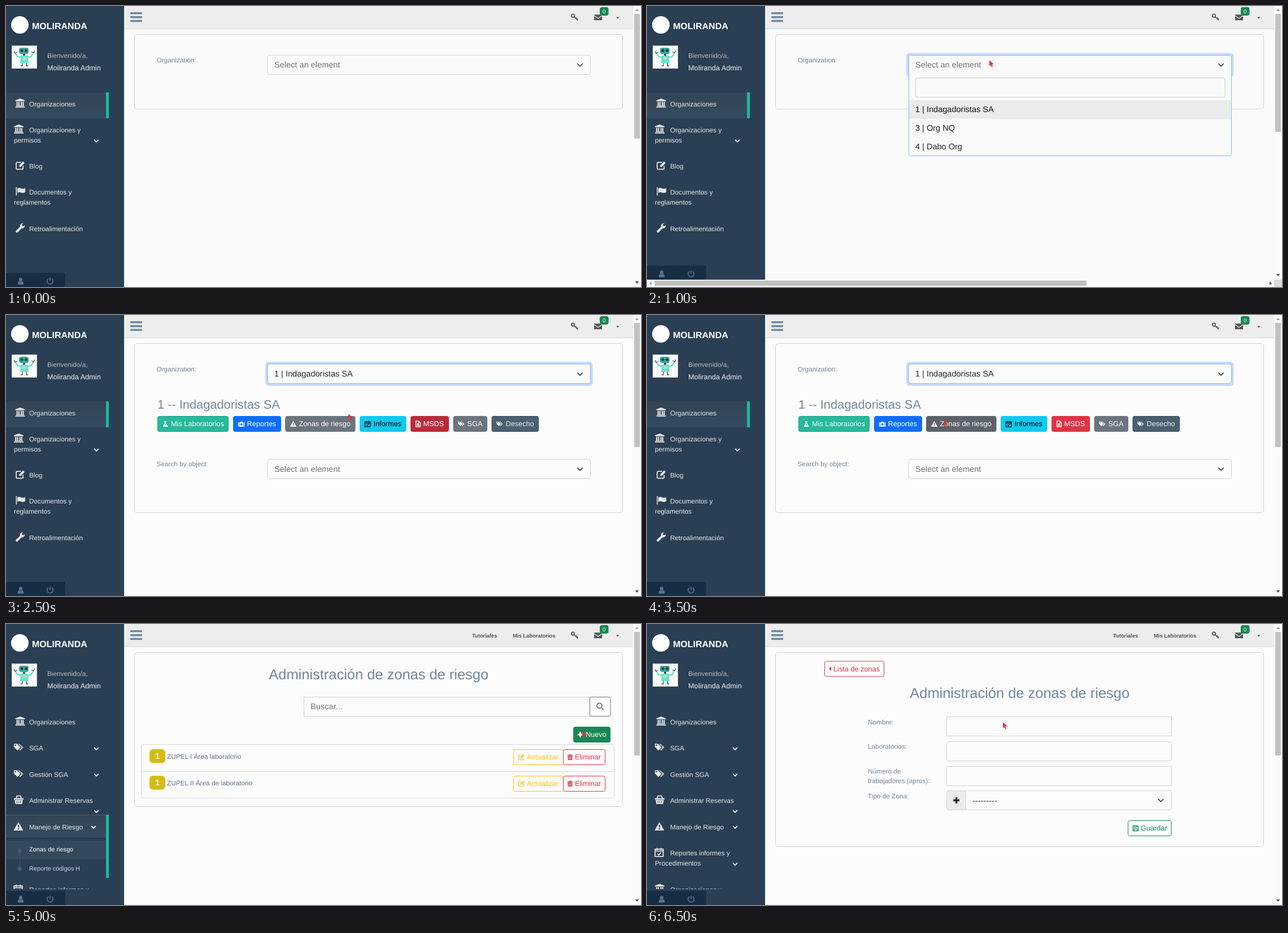
An HTML page that plays this animation: 1124 px wide and 498 px high, repeating every 8000 ms.

```html
<!DOCTYPE html>
<html lang="es">
<head>
<meta charset="utf-8">
<title>Zonas de riesgo</title>
<style>
html, body { margin: 0; width: 100%; height: 100%; overflow: hidden; background: #fcfcfc; }
svg { display: block; width: 100%; height: 100%; font-family: "Liberation Sans", Arial, sans-serif; text-rendering: geometricPrecision; }
</style>
</head>
<body>
<svg id="stage" viewBox="0 0 1124 498"></svg>
<script>
const S = 11.8, M = 12.72, L = 14.54;
const GRAY = '#6c757d', SLATE = '#73879c', LINE = '#ced4da', RED = '#dc3545', GREEN = '#198754',
  AMBER = '#ffc107', TEAL = '#1abb9c', NAVY = '#2a3f54', PALE = '#e7e7e7', INK = '#212529';

// 16 x 16 icons: [filled path, stroked path]
const ICONS = {
  bank: ['M8 0l8 3v1.5H0V3zM2 5.5h2v6h1v-6h2v6h2v-6h2v6h1v-6h2v6h.7v1.2H1.3v-1.2H2zM0 13.5h16V15H0z'],
  edit: ['M6 10.5V8l6.5-6.5L15 4l-6.5 6.5z', 'M12.5 9v3.5a2 2 0 0 1-2 2H3a2 2 0 0 1-2-2V5a2 2 0 0 1 2-2h6'],
  flag: ['M.5 1H2v14H.5zM3 3q3-2 6 0 3 1.5 7-.5v7q-4 2-7 .5-3-1.5-6 .5z'],
  wrench: ['M15.3 3.5L12.5 5l-2-1V1.8L13 .4A4.4 4.4 0 0 0 7.5 6L.8 12.2a1.8 1.8 0 0 0 2.8 2.8L10 8.5a4.4 4.4 0 0 0 5.3-5z'],
  user: ['M8 1a3.5 4 0 1 1 0 8 3.5 4 0 1 1 0-8zM2 15q-.5-6 3-6.5 3 2 6 0 3.5.5 3 6.5z'],
  power: ['', 'M4.8 3a6 6 0 1 0 6.4 0M8 1v6.5'],
  tags: ['M0 2h5l6 6-5 5.5-6-6zM2.5 3.3a1.2 1.2 0 1 0 .01 0zM7 2h1.6L15.5 8l-5.3 5.5-1.2-1L13 8z'],
  basket: ['M0 5.5h16v2.3H0zM1.3 8.5h13.4l-1 6.5H2.3zM4.5 10v3.5h1V10zM7.5 10v3.5h1V10zM10.5 10v3.5h1V10z', 'M3.5 6L5 1.5h6L12.5 6'],
  warn: ['M8 .8L16 15H0zM7 5.5V10h2V5.5zM7 11.3v2h2v-2z'],
  calendar: ['', 'M1.2 3h13.6v12H1.2zM1.2 6h13.6M4.7.8v3.6M11.3.8v3.6M5 10.3l2.2 2.2 4-4'],
  flask: ['M5 1h6v1.3H9.7v4L14 13.5q.5 1.5-1 1.5H3q-1.5 0-1-1.5l4.3-7.2v-4H5zM7.8 6.8l-2 3.4h4.4l-2-3.4z'],
  medkit: ['M0 4h2v11H0zM3 4h2V2h6v2h2v11H3zM6.3 3.2V4h3.4v-.8zM7 6.5v2H5v2h2v2h2v-2h2v-2H9v-2zM14 4h2v11h-2z'],
  file: ['', 'M2.5 1h7l4 4v10h-11zM9.5 1v4h4M5 7.8h6M5 10h6M5 12.3h6'],
  plus: ['M6 1.5h4V6h4.5v4H10v4.5H6V10H1.5V6H6z'],
  trash: ['M6 1h4l.7 1.5H15V4H1V2.5h4.3zM2.5 5h11v10h-11zM5 6.5v7h1v-7zM7.5 6.5v7h1v-7zM10 6.5v7h1v-7z'],
  search: ['', 'M6.8 1.5a5 5 0 1 1 0 10.2 5 5 0 1 1 0-10.2zM10.5 10.5l4.5 4.5'],
  save: ['', 'M1.5 1.5h10l3 3v10h-13zM4.5 1.5v4h6v-4M4 14.5v-5h8v5'],
  key: ['', 'M4.5 1.2a3.3 3.3 0 1 1 0 6.6 3.3 3.3 0 1 1 0-6.6zM7 7l7.5 7.5M10 10.5l2.3-2.3M12.5 13l2.3-2.3'],
  mail: ['M0 2.5h16v1.2L8 9.5 0 3.7zM0 5.3l8 5.9 8-5.9V14H0z'],
  chevron: ['', 'M2 5l6 6 6-6']
};

const text = (x, y, s, size = S, fill = SLATE, more = '') =>
  `<text x="${x}" y="${y}" font-size="${size}" fill="${fill}" ${more}>${s}</text>`;
const bold = 'font-weight="bold"', middle = 'text-anchor="middle"';
// edges given as left, top, right, bottom
const box = (x, y, r, b, fill = 'none', stroke = 'none', rx = 0) =>
  `<rect x="${x}" y="${y}" width="${r - x}" height="${b - y}" rx="${rx}" fill="${fill}" stroke="${stroke}"/>`;
const path = (d, fill, more = '') => `<path d="${d}" fill="${fill}" ${more}/>`;
const icon = (name, cx, cy, size, color, weight = 1.7) => {
  const [solid, line] = ICONS[name], k = size / 16;
  return `<g transform="translate(${cx - size / 2} ${cy - size / 2}) scale(${k})">` +
    path(solid, color, 'fill-rule="evenodd"') +
    (line ? path(line, 'none', `stroke="${color}" stroke-width="${weight}"`) : '') + '</g>';
};
const button = (x, y, r, b, label, tx, glyph, gx, color, fill = 'none', ink = color) =>
  box(x, y, r, b, fill, color, 3) + (glyph ? icon(glyph, gx, (y + b) / 2, 11.5, ink) : '') +
  text(tx, y + 17.8, label, M, ink);
const select = (y, label, color = GRAY, focus = false) =>
  (focus ? box(459, y - 4, 1038.5, y + 38.5, '#c5dafa', 'none', 6) : '') +
  box(463, y, 1034.5, y + 34.5, focus ? '#fcfcfc' : 'none', focus ? '#86b7fe' : LINE, 4) +
  text(475, y + 22, label, L, color) + icon('chevron', 1016, y + 17.5, 12.5, '#343a40', 2);
const card = bottom => box(227.5, 50.5, 1091.5, bottom, 'none', '#d0d2d4', 5);

function robot() {
  return box(10.5, 70.5, 54.5, 110.5, '#fbfbfb', '#cfd5da') +
    path('M16 83l5 7 7 1M49 82l-5 8-7 1', 'none', 'stroke="#4fdcc4" stroke-width="2"') +
    path('M14 80l2 4 4-2M51 79l-2 4-4-2M29 101v5h-3M36 101v5h3', 'none', 'stroke="#3b5560" stroke-width="1.3"') +
    box(23, 74, 40, 85, '#3ba898', 'none', 4) +
    '<circle cx="28" cy="79" r="2.6" fill="#24434c"/><circle cx="35.5" cy="79" r="2.6" fill="#24434c"/>' +
    path('M30 85h4v3h-4z', '#35535b') + path('M26 88h13l1 13H25z', '#5ce8cf') + box(29, 91, 36, 95, '#f6c8b8');
}

const chevron = (x, y) => icon('chevron', x, y, 10.5, PALE, 3);
const item = (y, name, ix, label, second = '') =>
  icon(name, ix, y - 1.5, 17, PALE) + text(41, y + 4, label, S, PALE) + (second && text(14, y + 22, second, S, PALE));
const active = (top, bottom) => box(0, top, 177, bottom, 'url(#active)');

const homeMenu = () => active(153, 199) + box(177, 153, 182, 199, TEAL) +
  item(174, 'bank', 25, 'Organizaciones') +
  item(220, 'bank', 22.5, 'Organizaciones y', 'permisos') + chevron(160, 239) +
  item(284, 'edit', 25.5, 'Blog') +
  item(330, 'flag', 25.5, 'Documentos y', 'reglamentos') +
  item(395, 'wrench', 25.5, 'Retroalimentación');

function riskMenu(open) {
  const cx = open ? 160 : 156;
  let s = open ? active(338, 380) + box(0, 338, 177, 339, '#4a5c6d') + box(0, 379, 177, 380, '#1e3042') +
    box(177, 338, 182, 450, TEAL) + box(0, 384, 177, 417, '#34485b') : '';
  s += item(174, 'bank', 25, 'Organizaciones') + item(220, 'tags', 22.5, 'SGA') + chevron(cx, 221) +
    item(267, 'tags', 22.5, 'Gestión SGA') + chevron(cx, 267.5) +
    item(313, 'basket', 22.5, 'Administrar Reservas') + chevron(cx, 332) +
    item(360, 'warn', 22, 'Manejo de Riesgo') + chevron(open ? 155 : 156, 360);
  if (open) {
    s += box(24, 402, 25, 434, '#425668') +
      [402, 434].map(y => `<circle cx="24.5" cy="${y}" r="3.5" fill="#4a5e70"/>`).join('') +
      text(41, 403, 'Zonas de riesgo', 10.9, '#fff') + text(41, 436.5, 'Reporte códigos H', 10.9, '#d2d6da') +
      item(471, 'calendar', 21.5, 'Reportes informes y');
  } else {
    s += item(406, 'calendar', 21.5, 'Reportes informes y', 'Procedimientos') + chevron(156, 425.5) +
      item(470.5, 'bank', 22.5, 'Organizaciones y');
  }
  return s;
}

function frame(menu, o) {
  const bottom = o.wide ? 485 : 498, foot = bottom - 25;
  return box(0, 0, 209, 498, NAVY) +
    '<circle cx="24.5" cy="33.5" r="15.5" fill="#fff"/>' +
    text(46, 41, 'MOLIRANDA', 16, '#fff', bold) + robot() +
    text(73, 92, 'Bienvenido/a,', S, '#bab8b8') + text(73, 113.5, 'Moliranda Admin', M, '#ecf0f1') +
    `<g clip-path="url(#side)">${menu}</g>` +
    box(0, foot, 104.5, 498, '#172d44') +
    icon('user', 26, foot + 14.5, 14, '#5a738e') + icon('power', 78, foot + 14.5, 14, '#5a738e', 2) +
    box(209, 0, 1110, 40, '#ededed') + box(209, 40, 1110, 41, o.tint ? '#c5d5ea' : '#d9dee4') +
    [11, 18, 24.8].map(y => box(220, y, 241, y + 3.4, '#6f889e', 'none', 1)).join('') +
    (o.links ? text(825, 24.3, 'Tutoriales', 9.4, '#515356', bold) + text(897, 24.3, 'Mis Laboratorios', 9.4, '#515356', bold) : '') +
    icon('key', 1006.5, 20, 13.5, '#515356', 2) + icon('mail', 1048, 20, 14, '#515356') +
    box(1051, 2, 1066.5, 17, GREEN, 'none', 4) + text(1058.7, 12.8, '0', 9.5, '#fff', middle) +
    path('M1080 19.5h5.5l-2.75 3z', '#515356') +
    box(1110, 0, 1124, 498, '#fbfbfb') + box(1112, 14, 1122, o.thumb, '#c1c1c1') +
    path('M1113.5 9h7l-3.5-4z', '#a3a3a3') + path(`M1113.5 ${bottom - 10}h7l-3.5 4z`, '#505050') +
    (o.wide ? box(0, 485, 1110, 498, '#fbfbfb') + box(13.5, 486.5, 778, 496, '#c1c1c1') +
      box(1110, 485, 1124, 498, '#dcdcdc') + path('M8 488v7l-4-3.5z', '#a3a3a3') + path('M1102 488v7l4-3.5z', '#505050') : '');
}

function home(open) {
  let s = box(209, 0, 1124, 498, '#fafafa') + card(182.5) + text(266.5, 100, 'Organization:');
  if (open) s += box(459, 83.5, 1038.5, 125.5, '#c5dafa', 'none', 5) +
    box(463.5, 87.5, 1034.5, 265.5, '#fafafa', '#86b7fe', 3) +
    box(475, 127.5, 1023, 161.5, 'none', '#c8ccd0', 3) + box(464, 167, 1034, 200, '#ebebeb') +
    text(475, 188, '1 | Indagadoristas SA', L, '#111') + text(475, 221, '3 | Org NQ', L, INK) +
    text(475, 253.5, '4 | Dabo Org', L, INK) +
    text(475, 109, 'Select an element', L, GRAY) + icon('chevron', 1016, 104.5, 12.5, '#343a40', 2);
  else s += select(87, 'Select an element');
  return s + frame(homeMenu(), { thumb: open ? 223 : 235, wide: open, tint: open });
}

function organization(hover) {
  const zone = hover ? '#5c636a' : GRAY, msds = hover ? RED : '#b92c3a';
  const tabs = [
    [268, 393.5, 'Mis Laboratorios', 292, 'flask', 282, '#26b99a', '#169f85'],
    [402, 486.5, 'Reportes', 426.5, 'medkit', 416.5, '#0d6efd'],
    [494, 618, 'Zonas de riesgo', 518.5, 'warn', 508.5, zone],
    [626, 708, 'Informes', 650.5, 'calendar', 640, '#0dcaf0', '#0dcaf0', '#000'],
    [716, 783.5, 'MSDS', 738.5, 'file', 729.5, msds],
    [791.5, 851.5, 'SGA', 816.5, 'tags', 806, GRAY],
    [859.5, 942.5, 'Desecho', 884.5, 'tags', 874, '#4b5f71', '#364b5f', '#e9edef']
  ];
  return card(350.5) + text(266.5, 100, 'Organization:') + select(87, '1 | Indagadoristas SA', INK, true) +
    text(268, 165.5, '1 -- Indagadoristas SA', 21.8) +
    tabs.map(([x, r, label, tx, glyph, gx, fill, edge = fill, ink = '#fff']) =>
      button(x + .5, 179.5, r, 206.5, label, tx, glyph, gx, edge, fill, ink)).join('') +
    text(266.5, 268, 'Search by object:') + select(255.5, 'Select an element') +
    frame(homeMenu(), { thumb: 234, tint: true });
}

const title = y => text(659.7, y, 'Administración de zonas de riesgo', 25.44, SLATE, middle);

function zones(hover) {
  const row = (y, label) => box(254, y, 282, y + 24.5, '#d4bc0f', 'none', 6) +
    text(268, y + 16.5, '1', L, '#fff', bold + middle.padStart(22)) + text(285, y + 17, label, S, '#5a738e') +
    button(898.5, y + .5, 986.5, y + 27.5, 'Actualizar', 922, 'edit', 912.5, AMBER) +
    button(986.5, y + .5, 1060.5, y + 27.5, 'Eliminar', 1007, 'trash', 998.5, RED);
  return card(323.5) + title(98) +
    box(527.5, 129.5, 1033.5, 163.5, 'none', LINE) + text(539, 151, 'Buscar...', L, GRAY) +
    box(1033.5, 129.5, 1070, 163.5, 'none', GRAY, 3) + icon('search', 1051.5, 146, 14, GRAY, 2.2) +
    button(1004.5, 182.5, 1069.5, 209.5, 'Nuevo', 1026, 'plus', 1016.5, GREEN, hover ? GREEN : 'none', hover ? '#fff' : GREEN) +
    box(239.5, 213.5, 1076.5, 308.5, 'none', '#d5d7d9', 5) + box(240, 261, 1076, 262, '#d5d7d9') +
    row(222, 'ZUPEL I Área laboratorio') + row(269, 'ZUPEL II Área de laboratorio') +
    frame(riskMenu(true), { thumb: hover ? 233 : 235, links: true });
}

function form() {
  const field = (y, rx) => box(530.5, y, 928.5, y + 34, 'none', LINE, rx);
  return card(394.5) + button(314.5, 66, 419.5, 93, 'Lista de zonas', 330, '', 0, RED) +
    path('M326 75v8l-4-4z', RED) + title(131) +
    text(391, 178, 'Nombre:') + text(391, 221.3, 'Laboratorios:') + text(391, 264.8, 'Número de') +
    text(391, 282.3, 'trabajadores (aprox):') + text(391, 308.5, 'Tipo de Zona:') +
    field(164.5, 0) + field(208.5, 4) + field(252.5, 0) +
    path('M564.5 295.5h-30a4 4 0 0 0-4 4v26a4 4 0 0 0 4 4h30z', '#ececec', `stroke="${LINE}"`) + field(295.5, 4) +
    icon('plus', 547.5, 312.5, 13.5, INK) + text(576, 317.5, '---------', L, INK) +
    icon('chevron', 909.5, 312.5, 12.5, '#343a40', 2) +
    button(851.5, 348.5, 928, 375.5, 'Guardar', 874, 'save', 865, GREEN) +
    frame(riskMenu(false), { thumb: 233, links: true });
}

const pointer = (x, y) => path('M0 0v10.6l2.4-2.2 1.9 4.1 1.9-.9-1.9-4H8z', RED, `transform="translate(${x} ${y})"`);
const defs = `<defs><linearGradient id="active" x2="0" y2="1"><stop stop-color="#334556"/><stop offset="1" stop-color="#344a5e"/></linearGradient>
<clipPath id="side"><rect width="209" height="469.7"/></clipPath></defs>`;

// start time, screen, pointer
const steps = [
  [0, home(false), ''],
  [500, home(false), pointer(606, 96)],
  [1000, home(true), pointer(606, 96)],
  [2000, home(true), pointer(606, 175)],
  [2500, organization(false), pointer(606, 175)],
  [3500, organization(true), pointer(525, 186)],
  [4000, zones(false), pointer(525, 186)],
  [5000, zones(true), pointer(1020, 189)],
  [5500, form(), pointer(1020, 189)],
  [6500, form(), pointer(630, 174)]
];

const stage = document.getElementById('stage');
let shown, begin;
function tick(now) {
  begin ??= now;
  const t = (now - begin) % 8000;
  const step = steps.findLast(s => s[0] <= t);
  if (step !== shown) {
    stage.innerHTML = defs + step[1] + step[2];
    shown = step;
  }
  requestAnimationFrame(tick);
}
requestAnimationFrame(tick);
</script>
</body>
</html>
```
